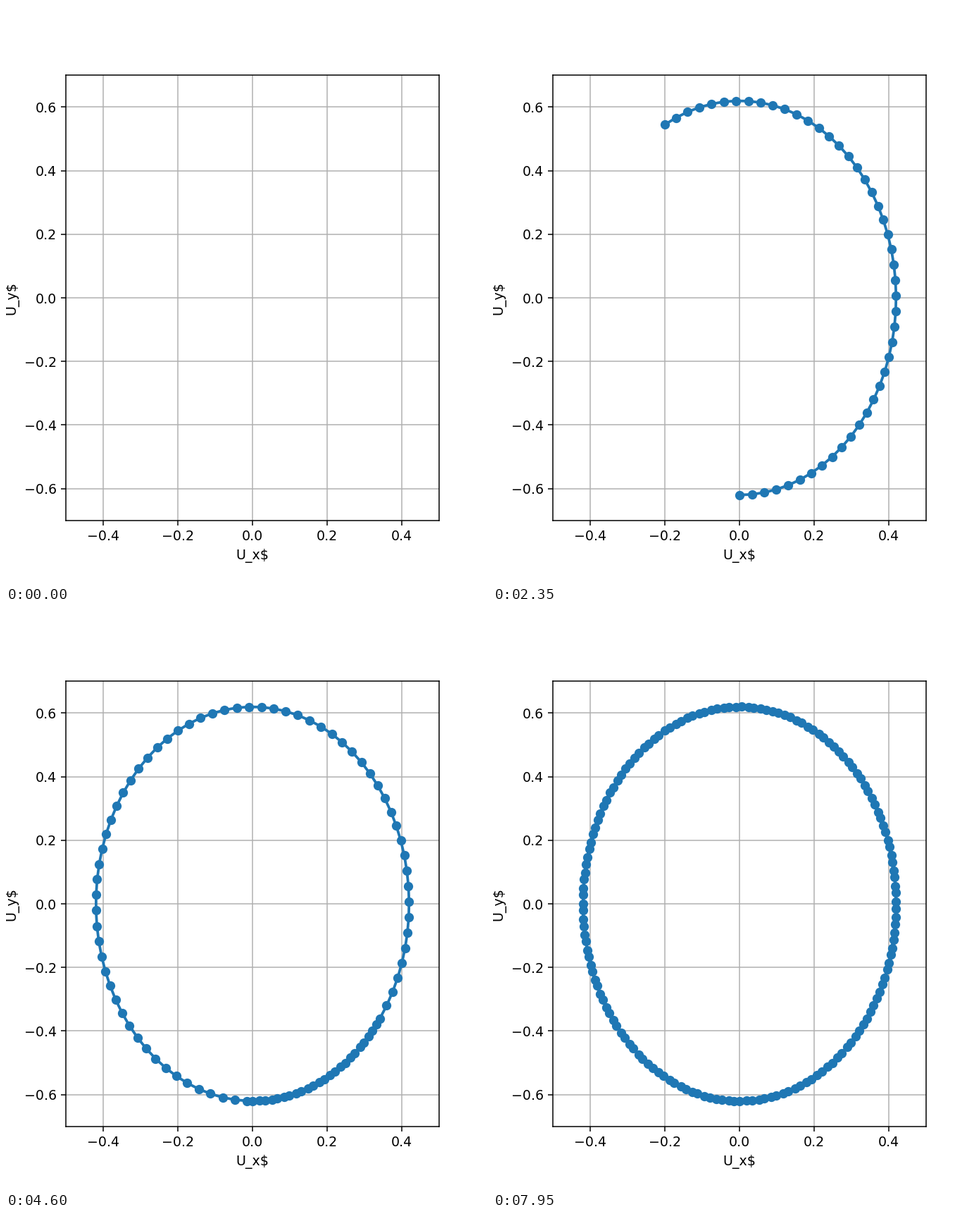
A matplotlib script for the animation above (8 s loop, 683 by 820 pixels).

```python
import numpy as np
import matplotlib.pyplot as plt
from matplotlib.animation import FuncAnimation

WIDTH, HEIGHT, DPI = 683, 820, 136.6
FRAMES, INTERVAL = 160, 50
STEP = 0.0791          # angle advanced per frame, in radians
AMP_X, AMP_Y = 0.42, 0.62

plt.rcParams["font.family"] = "DejaVu Sans"

fig, ax = plt.subplots(
    figsize=((WIDTH + 1e-4) / DPI, (HEIGHT + 1e-4) / DPI), dpi=DPI)
ax.set_xlim(-0.5, 0.5)
ax.set_ylim(-0.7, 0.7)
ax.set_xlabel("U_x$")
ax.set_ylabel("U_y$")
ax.grid()

trail, = ax.plot([], [], "o-", lw=2, color="#1f77b4")


def init():
    trail.set_data([], [])
    return trail,


def update(frame):
    """Show one more point of the ellipse on every frame."""
    angle = STEP * np.arange(frame)
    trail.set_data(AMP_X * np.sin(angle), -AMP_Y * np.cos(angle))
    return trail,


anim = FuncAnimation(fig, update, frames=FRAMES, init_func=init,
                     interval=INTERVAL, repeat=True)
plt.show()
```
